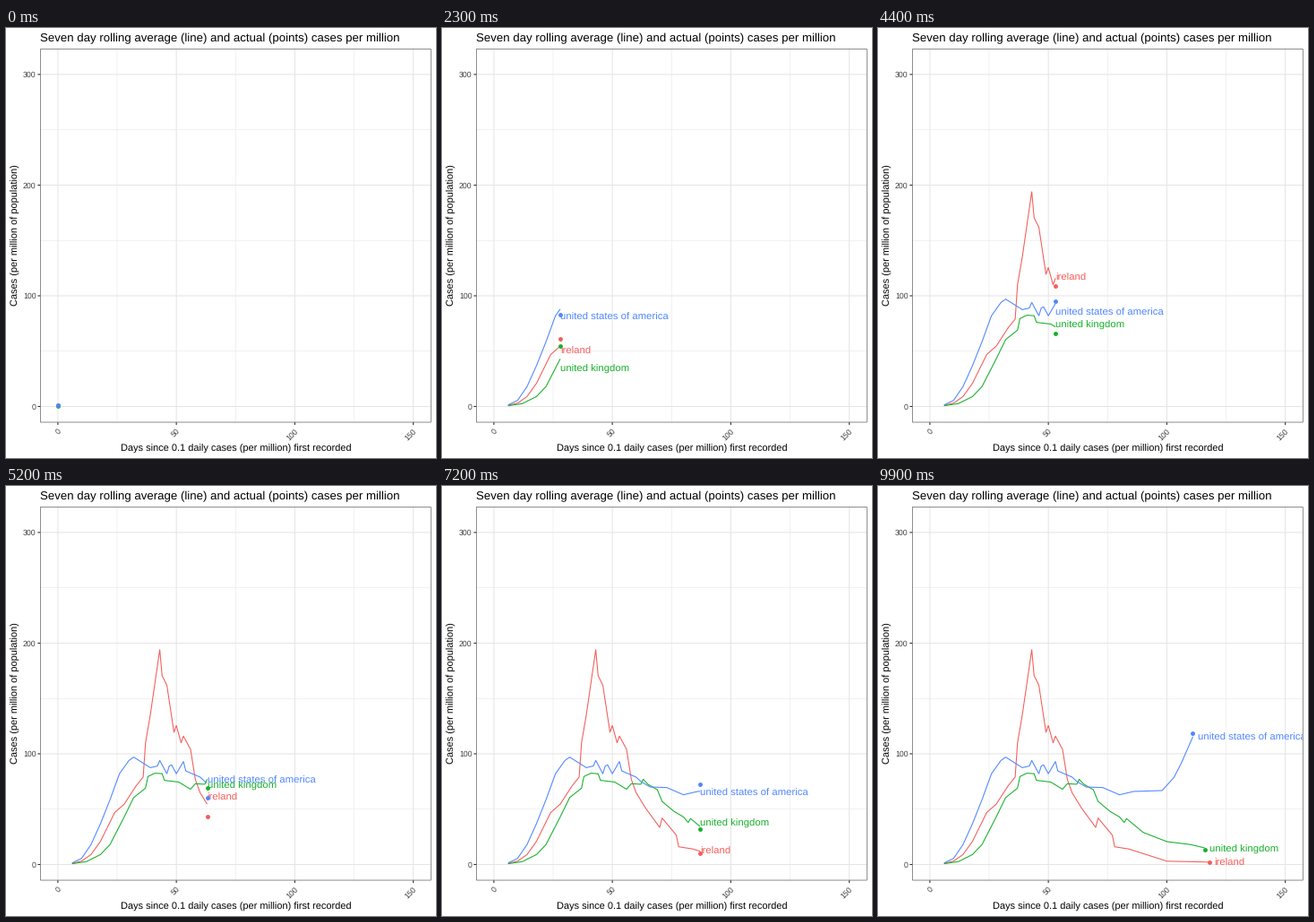
A matplotlib script that plays this animation: 480 px wide and 480 px high, repeating every 10 s.

```python
import numpy as np
import matplotlib.pyplot as plt
from matplotlib.animation import FuncAnimation
from matplotlib.patches import Rectangle

SIZE, DPI = 480, 100
FRAMES, LAST_DAY = 100, 120
FIRST = 6  # first day with a full seven day window
LAG = 2
LEFT, TOP, RIGHT, BOTTOM = 38.2, 23.2, 474.5, 440.3
PX = 72 / DPI  # points per pixel

plt.rcParams["font.family"] = "Liberation Sans"
plt.rcParams["text.hinting"] = "none"


def px(day):
    return 57.9 + 2.645 * np.asarray(day)


def py(value):
    return 422.5 - 1.2355 * np.asarray(value)


fig = plt.figure(figsize=(SIZE / DPI, SIZE / DPI), dpi=DPI, facecolor="white")
ax = fig.add_axes([0, 0, 1, 1])
ax.set(xlim=(0, SIZE), ylim=(SIZE, 0))
ax.axis("off")


def rule(xs, ys, color, width=1.07):
    ax.plot(xs, ys, color=color, lw=width * PX, snap=False,
            solid_capstyle="butt", zorder=1)


def write(x, y, text, size, color="black", **kw):
    return ax.text(x, y, text, fontsize=size * PX, color=color,
                   va="baseline", rotation_mode="anchor", **kw)


# Minor grid, then major grid with ticks and tick labels
for day in (25, 75, 125):
    rule([px(day)] * 2, [TOP, BOTTOM], "#e6e6e6", 0.53)
for value in (50, 150, 250):
    rule([LEFT, RIGHT], [py(value)] * 2, "#e6e6e6", 0.53)
for day in (0, 50, 100, 150):
    x = px(day)
    rule([x, x], [TOP, BOTTOM], "#e6e6e6")
    rule([x, x], [BOTTOM, BOTTOM + 2.75], "#2b2b2b")
    write(x + 4.4, 450.4, str(day), 8.8, "#404040", ha="right", rotation=45)
for value in (0, 100, 200, 300):
    y = py(value)
    rule([LEFT, RIGHT], [y, y], "#e6e6e6")
    rule([LEFT - 2.75, LEFT], [y, y], "#2b2b2b")
    write(33.6, y + 3.2, str(value), 8.8, "#404040", ha="right")

write(38.2, 15, "Seven day rolling average (line) and actual (points) "
      "cases per million", 13.2)
write(256.3, 473, "Days since 0.1 daily cases (per million) first recorded",
      11, ha="center")
write(14, 231.5, "Cases (per million of population)", 11,
      ha="center", rotation=90)

# Only the inner half of the border stroke is visible
panel = Rectangle((LEFT + .27, TOP + .27), RIGHT - LEFT - .54,
                  BOTTOM - TOP - .54, fill=False, ec="#2b2b2b",
                  lw=0.53 * PX, snap=False, zorder=9)
ax.add_patch(panel)


class Series:
    """Rolling average through key points, with daily values around it."""

    def __init__(self, name, color, end, swing, peak, keys):
        self.end = end
        days = np.arange(LAST_DAY + 1)
        at, value = zip(*keys)
        self.avg = np.interp(days, at, value)
        # A trailing mean runs three days late; reports rise and fall weekly
        week = 1 + swing * np.cos(2 * np.pi * (days - peak) / 7)
        self.daily = np.interp(days + 3, at, value) * week

        self.line, = ax.plot([], [], color=color, lw=1.07 * PX, zorder=3,
                             solid_capstyle="butt", solid_joinstyle="round")
        self.label = write(0, 0, name, 11.38, color, zorder=4, clip_on=True)
        self.label.set_clip_path(panel)
        self.dot, = ax.plot([], [], "o", color=color, ms=4.9 * PX, mew=0,
                            snap=False, zorder=5)

    def show(self, day):
        d = min(day, self.end)
        days = np.arange(FIRST, max(d + 1, FIRST))
        self.line.set_data(px(days), py(self.avg[days]))
        self.dot.set_data([px(d)], [py(self.daily[d])])

        # The label follows the average two days late
        at = min(day, self.end + LAG)
        self.label.set_visible(at >= FIRST + LAG)
        self.label.set_position((px(at), py(self.avg[at - LAG]) + 4.5))
        return [self.line, self.label, self.dot]


series = [
    Series("ireland", "#F35E5A", 118, 0.05, 4, [
        (6, 1), (10, 3), (14, 9), (18, 21), (24, 47), (28, 54.5), (33, 71),
        (36, 79), (37, 110), (39, 135), (43, 194), (44, 170.5), (46, 162),
        (49, 119.5), (50, 125.5), (52, 110), (53, 116), (56, 104), (58, 77),
        (60, 65), (64, 51), (70, 33.5), (71, 42), (77, 26.5), (78, 16),
        (84, 14), (100, 3), (121, 2)]),
    Series("united kingdom", "#17B12B", 116, 0.15, 2, [
        (6, 0.7), (12, 2.6), (18, 9), (22, 18), (28, 43), (32, 60.5),
        (37, 69), (38, 79.5), (41, 82.5), (44, 82), (45, 76), (51, 74.5),
        (56, 68), (58, 73), (62, 72.5), (63, 77), (65, 72.5), (69, 67.5),
        (71, 57), (76, 48), (80, 43), (82, 38), (83, 41.5), (90, 29),
        (100, 20.7), (110, 18), (119, 13.5)]),
    Series("united states of america", "#5086FF", 111, 0.15, 4, [
        (6, 1.4), (10, 5.5), (14, 18), (18, 37), (22, 58.5), (26, 82),
        (30, 94), (32, 97), (39, 87.5), (42, 89), (43, 94), (46, 82),
        (47, 89), (48, 90), (50, 82), (53, 93), (54, 84.5), (60, 79),
        (62, 75), (66, 70), (73, 69.5), (80, 63), (86, 66), (98, 66.8),
        (103, 78.6), (106, 91), (111, 115.5), (114, 123)]),
]


def update(frame):
    day = int(round(LAST_DAY * frame / (FRAMES - 1)))
    return [artist for s in series for artist in s.show(day)]


anim = FuncAnimation(fig, update, frames=FRAMES, interval=100,
                     repeat=True, repeat_delay=0)
plt.show()
```
